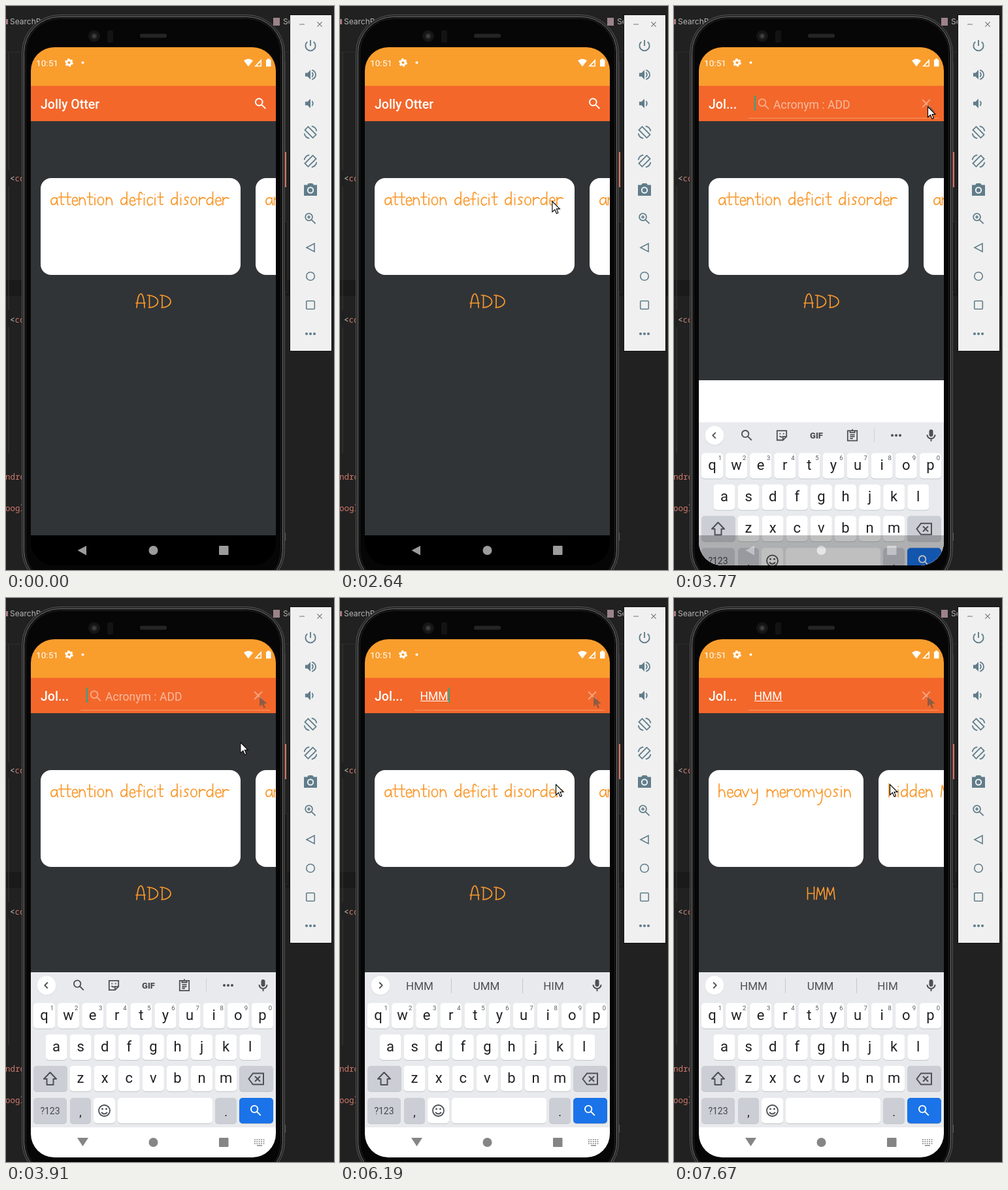
Animation of 502 by 862 pixels, one loop 8000 ms. Source, as an HTML page:

```html
<!DOCTYPE html>
<html lang="en">
<head>
<meta charset="utf-8">
<title>Acronym search</title>
<style>
html, body { margin: 0; height: 100%; overflow: hidden; background: #212121; }
svg { display: block; width: 100%; height: 100%; font-family: Roboto, sans-serif; }
.ln { fill: none; stroke-width: 2; }
.mid { text-anchor: middle; }
.hand path { fill: none; stroke: #f9982b; stroke-width: 1.7; stroke-linecap: round; stroke-linejoin: round; }
.code { font: 12.5px "Noto Sans Mono", monospace; fill: #d0786b; }
</style>
</head>
<body>
<svg id="stage" viewBox="0 0 502 862"></svg>
<script>
const LOOP = 8000;

// ---------- drawing helpers ----------
const rect = (x, y, w, h, fill, more = '') =>
  `<rect x="${x}" y="${y}" width="${w}" height="${h}" fill="${fill}" ${more}/>`;
const disc = (x, y, r, fill, more = '') =>
  `<circle cx="${x}" cy="${y}" r="${r}" fill="${fill}" ${more}/>`;
const path = (d, more = '') => `<path d="${d}" ${more}/>`;
const text = (x, y, size, fill, s, more = '') =>
  `<text x="${x}" y="${y}" font-size="${size}" fill="${fill}" ${more}>${s}</text>`;
const group = (id, body, more = '') => `<g id="${id}" ${more}>${body}</g>`;
// line icon on a 24 unit grid, centred on x, y
const icon = (x, y, s, d, color, more = '') =>
  `<path class="ln" stroke="${color}" transform="translate(${x} ${y}) scale(${s}) translate(-12 -12)" d="${d}" ${more}/>`;

const LENS = 'M15 9.5a5.5 5.5 0 1 0-11 0a5.5 5.5 0 1 0 11 0M13.6 13.6l6.1 6.1';
const CROSS = 'M6 6 18 18M18 6 6 18';
const ARROW = 'M0 0V16L4 12.5 6.5 18.5 9 17.4 6.5 11.5H11.5Z';

// ---------- handwriting: [advance, strokes] ----------
const bowl = 'M10-9C6-14 0-9 1-4S8 1 10-7', hump = 'M1-7C4-13 10-13 10 0', stem = 'M1-12V0';
const small = {
  a: [12.5, bowl + 'M10-11Q10-2 11.5 0'], d: [13.5, bowl + 'M10-20V0'],
  n: [12.5, stem + hump], h: [13, 'M1-20V0' + hump],
  m: [20, stem + hump + 'M10-7C13-13 18-13 18 0'],
  r: [11.5, stem + 'M1-7Q4-13 10-10'], i: [6, 'M2-11V0M2-16v.3'],
  t: [10, 'M4-19V-3Q4 1 8-1M0-12H9'], e: [11, 'M1-6H9C9-14 0-13 1-5S7 1 10-2'],
  o: [12.5, 'M5-12C-1-12-1 0 5 0S11-12 5-12'], f: [10, 'M9-17C7-21 4-20 4-14V0M0-9H8'],
  c: [10.5, 'M9-10C5-14 0-10 1-4S6 1 9-2'], s: [11, 'M8-11C3-14 0-9 4-7S8 0 1-1'],
  v: [13, 'M0-11 5 0 10-12'], y: [14, 'M1-12C1-3 9-3 10-12C11 2 10 12 3 12'], ' ': [10, '']
};
const caps = {
  A: [17.5, 'M1 0C2-10 3-20 7-21S13-8 13 0M0-7H14'],
  D: [19.5, 'M3-19V0M0-19C21-18 21-1 2 0'],
  H: [13.5, 'M1-18V0M11-19V0M1-9H11'],
  M: [15, 'M1 0 3-18 7-6 12-18 14 0']
};
function hand(x, y, s) {
  let out = '', at = 0;
  for (const ch of s) {
    const [step, d] = small[ch] || caps[ch];
    out += path(d, `transform="translate(${at})"`);
    at += step;
  }
  return `<g class="hand" role="img" aria-label="${s}" transform="translate(${x} ${y})">${out}</g>`;
}
const card = (w, s) => rect(0, 263, w, 148, '#fff', 'rx="16"') + hand(15, 304, s);

// ---------- scene parts ----------
function editor() {
  const guide = (y, h) => rect(3.5, y, 1, h, '#3a3a3a');
  const tag = y => text(6, y, 12.5, '#d0786b', '<tspan fill="#c9c9c9">&lt;</tspan>co', 'class="code"');
  return rect(0, 0, 502, 862, '#212121') + rect(0, 419, 502, 24, '#1a1a1a') +
    rect(0, 70, 502, 1, '#2d2d2d') + guide(71, 180) + guide(275, 190) + guide(491, 192) +
    rect(0, 20, 3, 8, '#a87880') + text(6, 28, 12, '#b4b4b4', 'SearchB', 'font-family="Inter, sans-serif"') +
    rect(409, 18, 10, 12, '#9b8389') + text(424, 28, 12, '#b4b4b4', 'Se', 'font-family="Inter, sans-serif"') +
    tag(268) + tag(484) +
    text(-1, 724, 12.5, '#d0786b', 'ndro', 'class="code"') + text(-1, 772, 12.5, '#d0786b', 'oogl', 'class="code"') +
    rect(426, 805, 2, 12, '#555');
}

function phone() {
  const shell = (n, fill, edge) =>
    rect(24.5 + n, 13.5 + n, 402 - 2 * n, 876 - 2 * n, fill, `rx="${58 - n}" stroke="${edge}"`);
  return rect(425, 86, 2.5, 140, '#4a4a4a') + rect(425, 223, 4, 54, '#d9705c') +
    rect(426, 330, 4, 107, '#151515', 'stroke="#3a3a3a" stroke-width=".6"') +
    shell(0, '#262626', '#505050') + shell(3, '#111', '#6e6e6e') + shell(6, '#060606', '#1c1c1c') +
    disc(135, 46, 9, '#151515') + disc(135, 46, 4.5, '#2c2c2c') + disc(135, 46, 2, '#484848') +
    rect(155, 37, 9, 19, '#131313', 'rx="3"') + rect(205, 42.5, 41, 6, '#252525', 'rx="3"');
}

function statusBar() {
  return rect(38, 63, 375, 59, '#f99d2d') + text(46, 92, 13.65, '#fff', '10:51') +
    disc(96.5, 86.5, 3.6, 'none', 'stroke="#fff" stroke-width="3"') +
    disc(96.5, 86.5, 5.4, 'none', 'stroke="#fff" stroke-width="2" stroke-dasharray="2.8 2.85"') +
    disc(117.5, 86.5, 2, '#fff') +
    path('M364 83.5Q371 78 378 83.5L371 92.5Z', 'fill="#fff"') +
    path('M391 81V92.5H380Z', 'fill="#fff"') + path('M389.5 85.5V91H384Z', 'fill="#f99d2d"') +
    path('M398 82H400V80.5H403.5V82H405.5V92.5H398Z', 'fill="#fff"');
}

function toolbar() {
  const soft = 'opacity=".42"';
  return rect(38, 122, 375, 54, '#f3672b') +
    group('closed', text(53, 157, 19.5, '#fff', 'Jolly Otter', 'font-weight="500"') +
      icon(389.7, 149.3, .975, LENS, '#fff')) +
    group('open', text(53, 157, 19.5, '#fff', 'Jol...', 'font-weight="500"') +
      rect(114, 171, 291, 1, '#fff', 'opacity=".3"') + icon(386, 149, .975, CROSS, '#fff', soft) +
      group('hint', icon(137.5, 150, .975, LENS, '#fff', soft) +
        text(152, 157, 17.6, '#fff', 'Acronym : ADD', 'opacity=".55"')) +
      text(122.5, 155.5, 17.5, '#fff', '', 'id="query"') +
      rect(123, 157, 0, 1, '#fff', 'id="underline"') + rect(123, 137, 2, 23, '#2fa58a', 'id="caret"'));
}

function content() {
  return rect(38, 176, 375, 633, '#313437') +
    group('oldCards', `<g transform="translate(53)">${card(306, 'attention deficit disorder')}</g>` +
      group('oldNext', card(306, 'an'))) +
    group('newCards', `<g transform="translate(53)">${card(237, 'heavy meromyosin')}</g>` +
      group('newNext', card(306, 'hidden M'))) +
    group('oldLabel', hand(199, 461, 'ADD')) + group('newLabel', hand(203.5, 460.5, 'HMM'));
}

function keyboard() {
  const gray = '#ccced5', ink = '#202124', dim = '#4d5054';
  const key = (x, y, w, fill = '#fff') =>
    rect(x, y + 1, w, 39, '#c3c5c9', 'rx="5"') + rect(x, y, w, 39, fill, 'rx="5"');
  let keys = '';
  [['qwertyuiop', 58.5, 619], ['asdfghjkl', 77, 667], ['zxcvbnm', 114, 715]].forEach(([row, x0, y], r) =>
    [...row].forEach((ch, i) => {
      const x = x0 + 37.1 * i;
      keys += key(x - 16.5, y, 33) + text(x, y + 26, 22, ink, ch, 'class="mid letter"');
      if (!r) keys += text(x + 12, y + 11, 9.5, '#55585c', (i + 1) % 10, 'class="mid"');
    }));
  keys += key(42, 715, 52, gray) + key(357, 715, 52, gray) + key(42, 764, 51, gray) + key(98, 764, 32, gray) +
    key(134, 764, 33) + key(171, 764, 145) + key(320, 764, 33, gray) + key(357, 764, 52, '#1a73e8') +
    path('M67.5 725 77 735H72.5V744H62.5V735H58Z', `id="shift" fill="none" stroke="${dim}" stroke-width="2" stroke-linejoin="round"`) +
    path('M378 726.5H394V743.5H378L371.5 735ZM381 731 389 739M389 731 381 739', `class="ln" stroke="${dim}"`) +
    text(67.5, 789, 14, '#44474b', '?123', 'class="mid"') + text(114, 792, 18, ink, ',', 'class="mid"') +
    text(336.5, 792, 18, ink, '.', 'class="mid"') + icon(382.5, 783.5, .95, LENS, '#fff') +
    disc(150.5, 783.5, 8.5, 'none', `stroke="${dim}" stroke-width="1.8"`) +
    disc(147.5, 781, 1.4, dim) + disc(153.5, 781, 1.4, dim) +
    path('M146 786Q150.500 791 155 786', `class="ln" stroke="${dim}"`);

  const tools = icon(62, 592, .9, 'M14 7 9 12 14 17', dim) + icon(111.500, 592, .95, LENS, dim) +
    icon(165, 592, .9, 'M4 4H20V14L14 20H4ZM20 14H14V20M9 8v2M15 8v2M8 13Q11 16 13 14', dim) +
    text(218, 596.5, 13, dim, 'GIF', 'class="mid" font-weight="900"') +
    icon(273, 592, .9, 'M4 4H20V21H4ZM8 4V7H16V4M12 1.500V4M8 11H16M8 14H16M8 17H13', dim) +
    rect(306, 581, 1, 22, '#cfd1d5') + [334, 340, 346].map(x => disc(x, 592, 2, dim)).join('');
  const words = icon(62, 592, .9, 'M10 7 15 12 10 17', dim) +
    [122, 224, 327].map(x => text(x, 599, 17, dim, '', 'class="mid word"')).join('') +
    rect(170, 581, 1, 23, '#c6c8cc') + rect(279, 581, 1, 23, '#c6c8cc');
  const mic = rect(390.5, 583, 6, 11, dim, 'rx="3"') +
    path('M387.5 591a6 6 0 0 0 12 0M393.500 597V601', `class="ln" stroke="${dim}"`);
  return rect(38, 572, 375, 237, '#e8eaed') + disc(62, 592.5, 15, '#d6d8dc') + disc(62, 592, 14.5, '#fff') +
    group('tools', tools) + group('words', words) + mic + keys;
}

function navigation(back, color) {
  return path(back, `fill="${color}"`) + disc(225.5, 832, 7, color) + rect(326, 825, 14.5, 14, color, 'rx="1"');
}

function lightNav() {
  let dots = '';
  for (let i = 0; i < 15; i++) dots += rect(380 + i % 5 * 3.4, 827 + Math.floor(i / 5) * 3, 1.8, 1.6, '#858585');
  return rect(38, 572, 375, 283, '#fff') + navigation('M109 825H126L117.500 838Z', '#858585') + dots +
    rect(384, 836, 8, 1.5, '#858585');
}

function sidePanel() {
  const c = '#607d8b', speaker = 'M3 9v6h4l5 5V4L7 9H3z';
  const turn = 'M8 2.500 21.500 16 16 21.500 2.500 8ZM14 1.500Q21 3 22.500 10M1.500 14Q3 21 10 22.500';
  return rect(434.5, 13.5, 64, 514, '#f0f0f0', 'stroke="#111"') +
    rect(449, 27.5, 8, 1, '#777') + icon(480, 28, .6, CROSS, '#777') +
    icon(466, 61, .95, 'M12 2.500v9.500M7 5.500a8 8 0 1 0 10 0', c, 'stroke-width="2.4"') +
    icon(466, 105, .9, speaker, c, `fill="${c}" style="fill:${c};stroke-width:0"`) +
    icon(466, 105, .9, 'M14.500 8Q18 12 14.500 16M14.500 4C23 7 23 17 14.500 20', c) +
    icon(466, 149, .9, speaker, c, `style="fill:${c};stroke-width:0"`) + icon(466, 149, .9, 'M14.500 8Q18 12 14.500 16', c) +
    icon(466, 193, .9, turn, c) + `<g transform="matrix(-1 0 0 1 932 0)">${icon(466, 237, .9, turn, c)}</g>` +
    path('M456 273.500H461L463 271H469L471 273.500H476V290H456Z', `fill="${c}"`) +
    disc(466, 281.5, 4.2, c, 'stroke="#f0f0f0" stroke-width="2"') +
    icon(466, 325, .98, LENS + 'M9.500 7V12M7 9.500H12', c, 'style="stroke-width:1.8"') +
    path('M472 363V375.500L460 369.200Z', `class="ln" style="stroke-width:1.6" stroke="${c}"`) +
    disc(466, 413, 6.3, 'none', `stroke="${c}" stroke-width="1.6"`) +
    rect(459.7, 450.7, 12.6, 12.6, 'none', `rx="1.5" stroke="${c}" stroke-width="1.6"`) +
    [460, 466, 472].map(x => disc(x, 501, 2.1, c)).join('');
}

const stage = document.getElementById('stage');
stage.innerHTML =
  `<defs><clipPath id="screen">${rect(38, 63, 375, 792, '#000', 'rx="36"')}</clipPath></defs>` +
  editor() + phone() +
  `<g clip-path="url(#screen)">` + statusBar() + toolbar() + content() +
  group('lightNav', lightNav()) + group('keys', keyboard()) +
  group('darkNav', rect(38, 809, 375, 46, '#000') + navigation('M123 825V839.500L109.500 832Z', '#9c9c9c')) + `</g>` +
  sidePanel() +
  path(ARROW, 'id="trail" transform="translate(388 150)" fill="#5b5550" opacity=".65"') +
  path(ARROW, 'id="pointer" fill="#fff" stroke="#000" stroke-width="1.1"');

// ---------- motion ----------
const $ = id => document.getElementById(id);
const set = (id, name, value) => $(id).setAttribute(name, value);
const show = (id, on) => { $(id).style.display = on ? '' : 'none'; };
const part = (t, a, b) => Math.min(1, Math.max(0, (t - a) / (b - a)));
const smooth = p => p * p * (3 - 2 * p);
const latest = (t, list) => list.filter(k => k[0] <= t).pop();
const letters = [...document.querySelectorAll('.letter')];
const wordSlots = [...document.querySelectorAll('.word')];

const moves = [
  [920, 483, 848], [1050, 471, 786], [1320, 471, 786], [1590, 286, 321], [2250, 286, 321],
  [2480, 303, 349], [2970, 389.5, 150], [3630, 389.5, 150], [3770, 388.5, 154],
  [3840, 388.5, 154], [3980, 330.5, 285]
];
const typed = [[0, '', 123], [5390, 'H', 135], [5790, 'HM', 150.5], [5990, 'HMM', 166]];
const underlines = [[0, 0], [5590, 12], [5990, 27.5], [6190, 43]];
const guesses = [[0, '', '', ''], [5590, 'H', 'He', 'Hi'], [5990, 'HM', 'UM', 'HI'], [6190, 'HMM', 'UMM', 'HIM']];
const blinks = [[0, 1], [4120, 0], [4590, 1], [5120, 0], [5320, 1], [6720, 0], [7190, 1], [7670, 0]];

function pointerAt(t) {
  const i = moves.findIndex(m => m[0] > t);
  if (i < 0) return moves[moves.length - 1].slice(1);
  const a = moves[Math.max(0, i - 1)], b = moves[i], p = smooth(part(t, a[0], b[0]));
  return [a[1] + (b[1] - a[1]) * p, a[2] + (b[2] - a[2]) * p];
}

function draw(t) {
  show('pointer', t >= 920);
  set('pointer', 'transform', `translate(${pointerAt(t)})`);
  show('trail', t >= 3700);

  // search field
  const [, query, caretX] = latest(t, typed);
  show('closed', t < 3430);
  show('open', t >= 3430);
  show('hint', t < 5320);
  $('query').textContent = query;
  set('underline', 'width', latest(t, underlines)[1]);
  set('caret', 'x', caretX);
  show('caret', latest(t, blinks)[1]);

  // keyboard
  const shift = t >= 5320 && t < 5390;
  const slide = 283 * (1 - part(t, 3690, 3850)) ** 2.1;
  show('lightNav', t >= 3700);
  show('keys', t >= 3700);
  set('keys', 'transform', `translate(0 ${slide})`);
  set('darkNav', 'opacity', t < 3770 ? 1 - .75 * part(t, 3700, 3770) : .25 * (1 - part(t, 3800, 3900)));
  set('shift', 'fill', shift ? '#4d5054' : 'none');
  for (const el of letters)
    el.textContent = shift ? el.textContent.toUpperCase() : el.textContent.toLowerCase();
  show('tools', t < 5590);
  show('words', t >= 5590);
  const words = latest(t, guesses);
  wordSlots.forEach((el, i) => { el.textContent = words[i + 1]; });

  // result cards
  set('oldCards', 'opacity', 1 - part(t, 7120, 7300));
  set('newCards', 'opacity', part(t, 7320, 7600));
  const next = 382 - 69 * smooth(part(t, 7180, 7560));
  set('oldNext', 'transform', `translate(${next})`);
  set('newNext', 'transform', `translate(${next})`);
  show('oldLabel', t < 7120);
  show('newLabel', t >= 7120);
}

const start = performance.now();
function tick(now) {
  draw(Math.max(0, now - start) % LOOP);
  requestAnimationFrame(tick);
}
tick(start);
</script>
</body>
</html>
```
